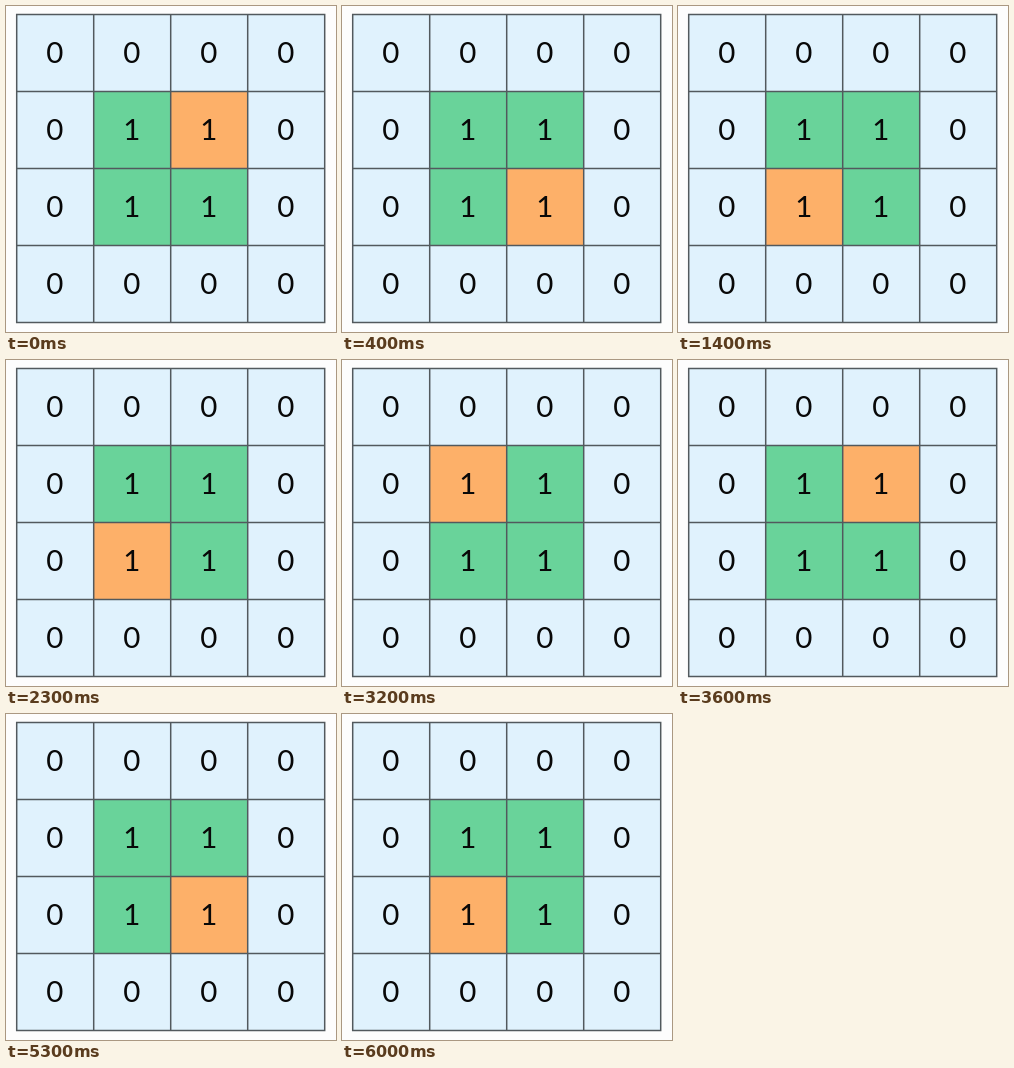
An HTML page with a canvas for the animation above (6100 ms loop, 330x326 px).

```html
<!DOCTYPE html>
<html lang="en">
<head>
<meta charset="utf-8">
<title>Grid walk</title>
<style>
  html, body { margin: 0; width: 100%; height: 100%; overflow: hidden; background: #fdfdfd; }
  canvas { display: block; width: 330px; height: 326px; }
</style>
</head>
<body>
<canvas id="stage"></canvas>
<script>
const W = 330, H = 326, LOOP = 6100;
const CELL = 77, LEFT = 10.7, TOP = 8.5, SIZE = 4;
const FIRST_MOVE = 400, STEP = 1000;
// Clockwise walk around the block of ones: [column, row]
const PATH = [[2, 1], [2, 2], [1, 2], [1, 1]];

const canvas = document.getElementById('stage');
const ctx = canvas.getContext('2d');
const dpr = window.devicePixelRatio || 1;
canvas.width = W * dpr;
canvas.height = H * dpr;
ctx.scale(dpr, dpr);

const isOne = (c, r) => c > 0 && c < 3 && r > 0 && r < 3;

function drawCell(c, r, active) {
  const x = LEFT + c * CELL, y = TOP + r * CELL;
  const one = isOne(c, r);
  ctx.fillStyle = active ? '#fdb069' : one ? '#69d39a' : '#e0f2fd';
  ctx.fillRect(x, y, CELL, CELL);
  ctx.fillStyle = '#080808';
  ctx.fillText(one ? '1' : '0', x + CELL / 2 - 0.4, y + 48.2);
}

function drawLines() {
  ctx.strokeStyle = '#52595d';
  ctx.lineWidth = 1.5;
  const span = SIZE * CELL;
  ctx.beginPath();
  for (let i = 0; i <= SIZE; i++) {
    const d = i * CELL;
    ctx.moveTo(LEFT + d, TOP - 0.75);
    ctx.lineTo(LEFT + d, TOP + span + 0.75);
    ctx.moveTo(LEFT - 0.75, TOP + d);
    ctx.lineTo(LEFT + span + 0.75, TOP + d);
  }
  ctx.stroke();
}

function draw(t) {
  const moves = Math.floor((t - FIRST_MOVE) / STEP) + 1;
  const [ac, ar] = PATH[moves % PATH.length];
  ctx.fillStyle = '#fdfdfd';
  ctx.fillRect(0, 0, W, H);
  ctx.font = '29.5px Lato, sans-serif';
  ctx.textAlign = 'center';
  for (let r = 0; r < SIZE; r++) {
    for (let c = 0; c < SIZE; c++) drawCell(c, r, c === ac && r === ar);
  }
  drawLines();
}

const start = performance.now();
function tick() {
  draw((performance.now() - start) % LOOP);
  requestAnimationFrame(tick);
}
tick();
</script>
</body>
</html>
```
